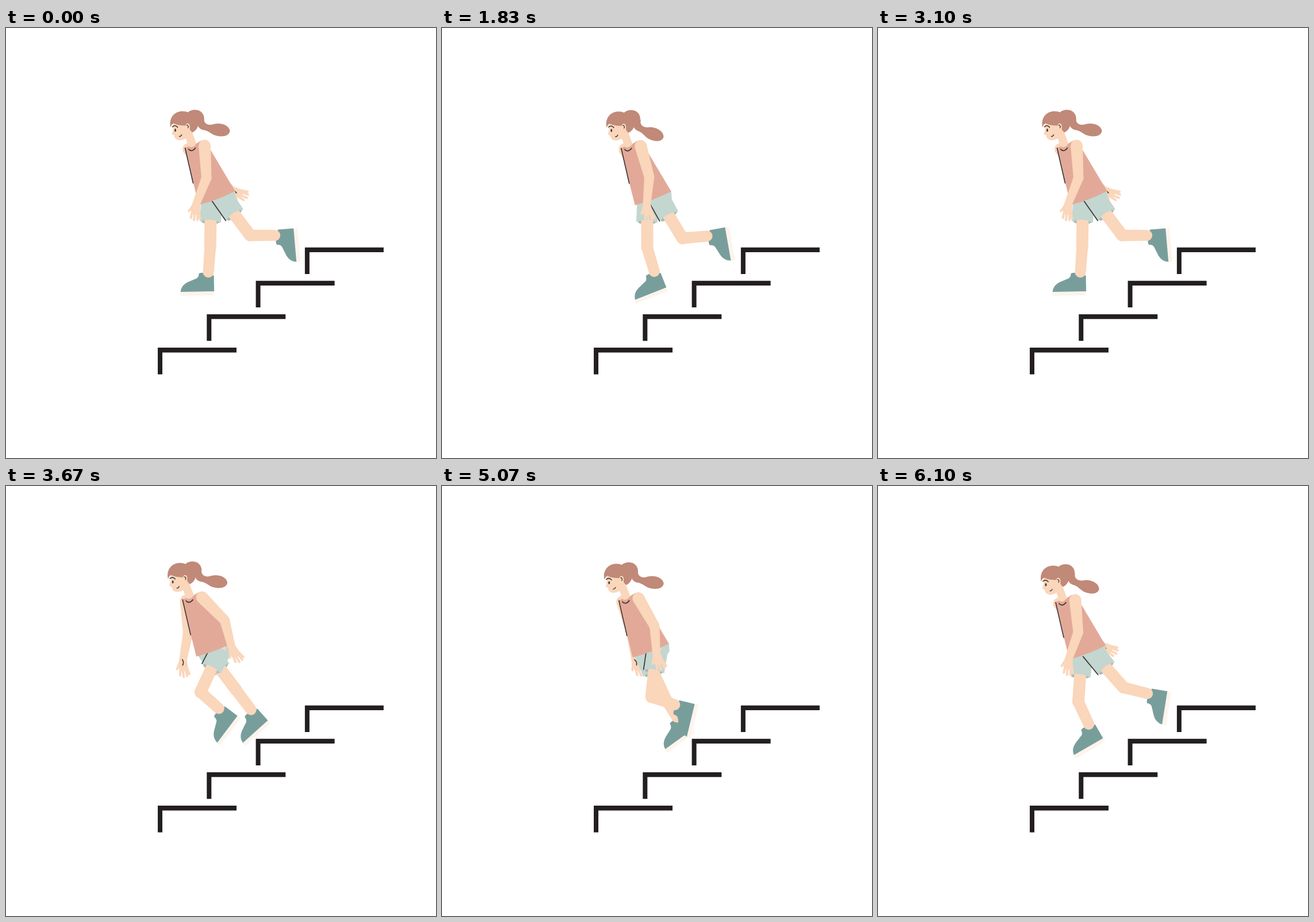
Recreate the animation shown at these times as an HTML page with a canvas. Size 748x748 px, loop 6130 ms.

```html
<!DOCTYPE html>
<html lang="en">
<head>
<meta charset="utf-8">
<title>Walking downstairs</title>
<style>
html, body { margin: 0; width: 100%; height: 100%; overflow: hidden; background: #fff; }
canvas { display: block; }
</style>
</head>
<body>
<canvas id="stage" width="748" height="748"></canvas>
<script>
const ctx = document.getElementById('stage').getContext('2d');
const LOOP = 6130, CYCLE = 22;
const SKIN = '#fad6bb', HAIR = '#c08978', SHIRT = '#e2a998', SHORTS = '#c3d6d0',
  HEM = '#a5bdb7', SHOE = '#789e9c', SOLE = '#fdf4ec', LINE = '#3b3434', STAIR = '#231f20';

const rad = deg => deg * Math.PI / 180;
const wave = (step, size, peak, period = CYCLE) =>
  size * Math.cos(2 * Math.PI * (step - peak) / period);

// Cosine easing through [step, angle] turning points, repeating every cycle.
function swing(step, points) {
  const at = step % CYCLE;
  const i = points.findLastIndex(([key]) => key <= at);
  const [from, a] = points[i];
  const [to, b] = points[i + 1] || [CYCLE, points[0][1]];
  return a + (b - a) * (1 - Math.cos(Math.PI * (at - from) / (to - from))) / 2;
}

// Limb angles in degrees from straight down, positive to the right.
function poseAt(step) {
  return {
    bob: -5 + wave(step, 10.5, 1.8, CYCLE / 2) - wave(step, 2.5, 19),
    tail: 12 * Math.max(0, wave(step, 2, 3.95, CYCLE / 4) - 1),
    nearUpper: 30 + wave(step, 27, 11.5),
    nearFore: 12 + wave(step, 33, 12.5) + wave(step, 8, 14.5, CYCLE / 2),
    farUpper: 20 + wave(step, 25, 0),
    farFore: 13 + wave(step, 36, 0),
    nearThigh: swing(step, [[0, 37], [2, 50], [8, -25], [14, -8], [20, 46]]),
    nearShin: swing(step, [[0, 90], [4, 95], [8, 48], [11, 0], [14, 16], [20, 62]]),
    farThigh: swing(step, [[0, -1], [2, -12], [8, 37], [13, 58], [20, -7]]),
    farShin: swing(step, [[0, -4], [8, 37], [14.5, 94], [20, 54]])
  };
}

const reach = ([x, y], deg, length) =>
  [x + length * Math.sin(rad(deg)), y + length * Math.cos(rad(deg))];

function fill(path, color) {
  ctx.fillStyle = color;
  ctx.fill(new Path2D(path));
}

function line(path, color, width) {
  ctx.strokeStyle = color;
  ctx.lineWidth = width;
  ctx.stroke(new Path2D(path));
}

function oval(x, y, rx, ry, color) {
  ctx.fillStyle = color;
  ctx.beginPath();
  ctx.ellipse(x, y, rx, ry, 0, 0, 7);
  ctx.fill();
}

function turned([x, y], deg, draw) {
  ctx.save();
  ctx.translate(x, y);
  ctx.rotate(-rad(deg));
  draw();
  ctx.restore();
}

// Tapered segment with round ends.
function bone(start, deg, length, r1, r2) {
  turned(start, deg, () => {
    fill(`M${-r1} 0L${-r2} ${length}L${r2} ${length}L${r1} 0Z`, SKIN);
    oval(0, 0, r1, r1, SKIN);
    oval(0, length, r2, r2, SKIN);
  });
  return reach(start, deg, length);
}

function arm(shoulder, upper, fore, creased) {
  const elbow = bone(shoulder, upper, 56, 10.5, 8.7);
  const wrist = bone(elbow, fore, 48, 8.7, 6.7);
  turned(wrist, fore + 13, () => {
    fill('M-6.5 -1L-9 10L-6 19L8 20L8 10L6.5 -1Z', SKIN);
    line('M-5 3L-11 15M-5 14L-6 26M-1 14L0 29M4 14L6 28M6 12L10 25', SKIN, 4);
    if (creased) line('M-1 -1Q2 4 -1 9', LINE, 1.6);
  });
}

function leg(hip, thigh, shin, seam) {
  turned(hip, thigh, () => oval(0, 35, 16, 4.5, HEM));
  const knee = reach(hip, thigh, 80), ankle = reach(knee, shin, 50);
  turned(ankle, shin + 5, () => {
    fill('M-49 26H10V33.5H-49Z', SOLE);
    fill('M10 26.5V-1L-2 -3Q-9 -8 -16 -5Q-16 1 -20 3.5L-36 10Q-47 15 -48.5 26.5Z', SHOE);
  });
  bone(hip, thigh, 80, 10.5, 10.5);
  bone(knee, shin, 43, 10, 9.5);
  turned(hip, thigh, () => {
    fill('M-17 -7L-19 35Q0 27 18 37L20 -2Z', SHORTS);
    if (seam) line('M-17 -7L-18.5 34', LINE, 1.7);
  });
}

function head(tail) {
  fill('M311 185L318 208Q325 213 332 203L324 182Z', SKIN);
  fill('M291 165L291 178L289 186L293 188Q294 197 304 196.5Q315 195 323 185L322 164Z', SKIN);
  turned([338, 165], -tail, () => fill('M7 -7C6 3 14 6 22 4C34 0 50 4 52 15C51 24 40 26 30 24' +
    'C20 22 17 16 8 14C-1 13 -4 8 -5 0Z', HAIR));
  fill('M287 174C283 160 292 146 307 146Q314 146 317 148C324 141 342 141 345 156' +
    'C346 164 340 169 335 169Q334 178 325 183Q321 181 320 176L313 171Q299 171 292 167Q288 169 287 174Z', HAIR);
  oval(316.5, 173, 4, 6, SKIN);
  line('M315 170Q319 171 317 175', LINE, 1.3);
  line('M290 173Q295 169 299 174', LINE, 1.6);
  oval(295, 179, 1.4, 2.7, LINE);
  line('M302 190Q305 190 306 187', LINE, 1.4);
}

function torso() {
  fill('M311 210L318 207Q325 212 332 202L340 197L352 206L399 285Q370 300 336 309Z', SHIRT);
  line('M312 210L326 271', LINE, 1.6);
  line('M318 212Q324 218 330 210', LINE, 1.7);
}

function stairs() {
  for (let i = 0; i < 4; i++) {
    fill(`M${264 + 85.3 * i} ${556.1 - 58.15 * i}h137v8.3h-129v38h-8Z`, STAIR);
  }
}

function draw(step) {
  const pose = poseAt(step);
  ctx.fillStyle = '#fff';
  ctx.fillRect(0, 0, 748, 748);
  stairs();
  ctx.save();
  ctx.translate(pose.bob * 0.4, pose.bob);
  arm([318, 212], pose.farUpper, pose.farFore, true);
  leg([357, 303], pose.farThigh, pose.farShin, false);
  fill('M340 306L399 284L400 298Q394 310 380 312L356 316Z', SHORTS);
  leg([377, 298], pose.nearThigh, pose.nearShin, true);
  head(pose.tail);
  torso();
  arm([346, 206], pose.nearUpper, pose.nearFore, false);
  ctx.restore();
}

// Ten drawings every 700 ms; the first of each ten is held longer.
function stepAt(ms) {
  const rest = ms % 700;
  const within = rest < 100 ? 0 : 1 + Math.floor((rest - 96) * 3 / 200);
  return Math.floor(ms / 700) * 10 + within;
}

ctx.lineCap = 'round';
const began = performance.now();
function tick() {
  draw(stepAt((performance.now() - began) % LOOP));
  requestAnimationFrame(tick);
}
tick();
</script>
</body>
</html>
```
